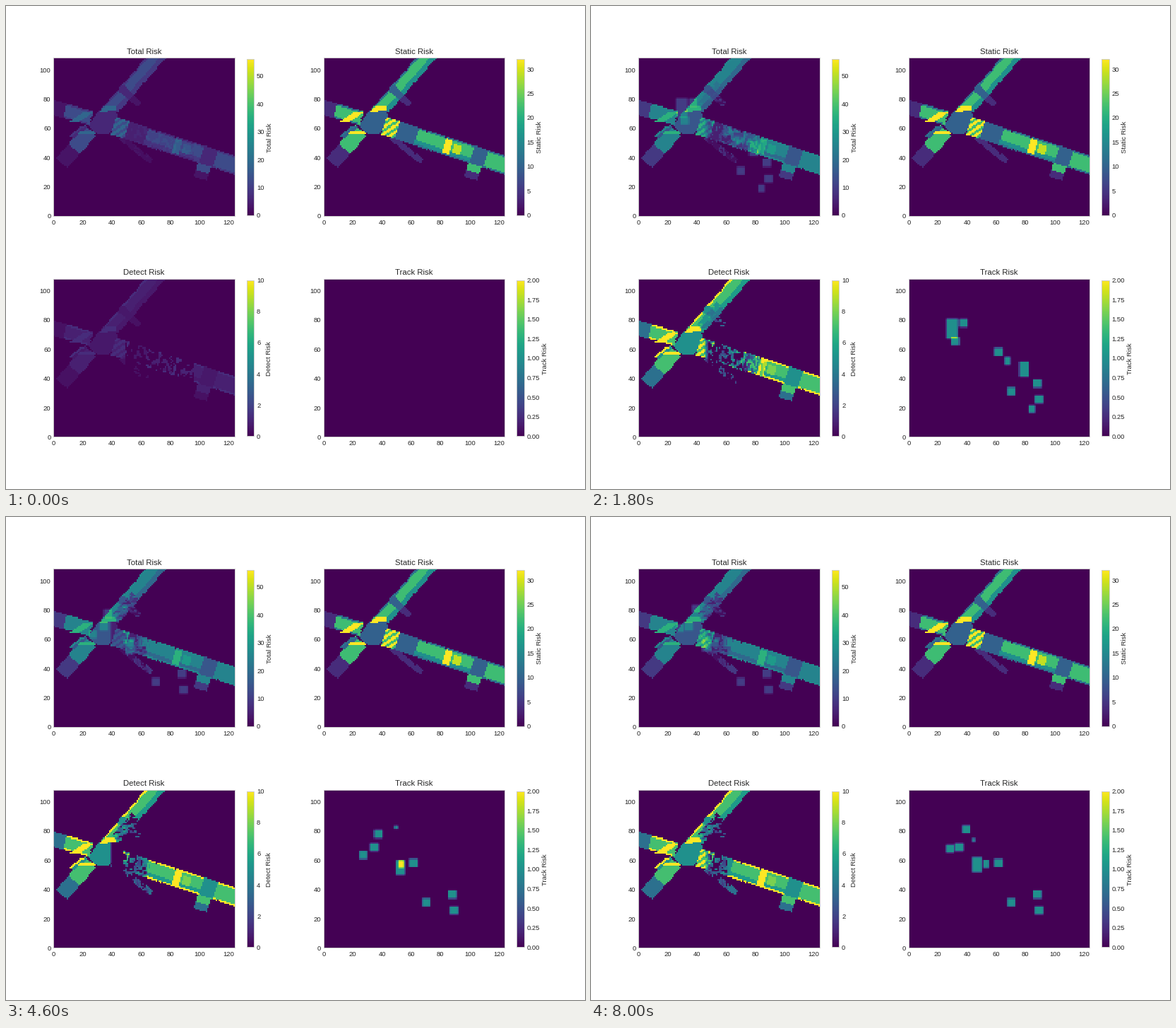
Animation of 820x683 px, one loop 8200 ms. Source, as a matplotlib script:

```python
import matplotlib.pyplot as plt
import numpy as np
from matplotlib.animation import FuncAnimation
from matplotlib.path import Path

W, H, DPI = 820, 683, 820 / 12
FRAMES, STEP_MS = 41, 200
NX, NY = 124, 108
EDGE = 1.2            # width of the kerb strip, in cells

plt.rcParams.update({
    "font.family": "Liberation Sans", "font.size": 10,
    "axes.titlesize": 12, "axes.edgecolor": ".8", "axes.linewidth": 1,
    "text.color": ".15", "axes.labelcolor": ".15",
    "xtick.color": ".15", "ytick.color": ".15",
    "xtick.major.size": 0, "ytick.major.size": 0,
    "xtick.major.pad": 5, "ytick.major.pad": 4, "axes.grid": False,
})

rng = np.random.default_rng(7)
X, Y = np.meshgrid(np.arange(NX) + 0.5, np.arange(NY) + 0.5)
CELLS = np.column_stack([X.ravel(), Y.ravel()])

static = np.zeros((NY, NX))
weight = np.zeros((NY, NX))   # detect risk once a cell is fully observed

# Surface kinds: static risk, detect weight
PATH, PLAIN, SIDE = (4, 3.7), (10, 5), (16, 5.5)
LANE, KERB, CROSS = (22, 7), (12, 10), (32, 10)


def paint(mask, kind):
    static[mask], weight[mask] = kind


def quad(*pts):
    return Path(pts).contains_points(CELLS).reshape(NY, NX)


class Arm:
    """Straight road in its own along/across coordinates."""

    def __init__(self, x, y, deg, half):
        c, s = np.cos(np.radians(deg)), np.sin(np.radians(deg))
        self.u = (X - x) * c + (Y - y) * s
        self.v = (Y - y) * c - (X - x) * s
        self.half = half

    def part(self, u0, u1, v0=None, v1=None):
        v0 = -self.half if v0 is None else v0
        v1 = self.half if v1 is None else v1
        u, v = self.u, self.v
        return (u >= u0) & (u < u1) & (v >= v0) & (v < v1)

    def kerbs(self, u0, u1):
        return self.part(u0, u1) & (abs(self.v) > self.half - EDGE)


north = Arm(37, 70, 48.8, 5.2)
west = Arm(0, 73.9, -15.5, 5)
south = Arm(5.75, 36, 49, 5.2)
east = Arm(50, 58.6, -17.9, 6.2)

paint(north.part(0, 58), LANE)
paint(north.part(0, 58, v1=-1.8), SIDE)
paint(north.part(3, 58, v0=north.half - EDGE), KERB)
paint(north.part(16.5, 21.5), PLAIN)
paint(north.part(16.5, 21, -13, -north.half), PATH)

paint(west.part(-4, 8), PATH)
paint(west.part(8, 27), LANE)
paint(west.kerbs(8, 25), KERB)
paint(quad((9.5, 63.5), (17, 63.5), (27.5, 71), (21, 71)), CROSS)

paint(south.part(13, 30), LANE)
paint(south.part(0, 13), PATH)
paint(quad((10.5, 54.5), (19.5, 61.5), (24, 61), (14, 53)), PLAIN)
paint(quad((10.5, 54.5), (19.5, 61.5), (21.5, 61.2), (12.2, 54)), KERB)
paint(quad((15.5, 55.5), (18, 58), (31, 58), (30.5, 55.8)), CROSS)

paint(Arm(46, 54, -38.7, 2).part(0, 27), PATH)
paint(east.part(-9.5, 14), PLAIN)
paint(east.part(14, 82), LANE)
paint(east.part(14, 54, v1=-2.5), SIDE)
paint(east.part(34, 39, -4.8, 4.8), CROSS)
paint(east.part(40.5, 46, -3, 3), (29, 8))
paint(east.kerbs(14, 82), KERB)
paint(east.part(54, 64), PLAIN)
paint(east.part(53.5, 62.5, -11, -east.half), LANE)
paint(east.part(53.5, 62.5, -16, -11), PATH)

paint(quad((24, 61.5), (30.5, 71.5), (44, 71.5), (44, 63), (38, 56.5),
           (29, 56)), PLAIN)
paint(quad((31.5, 71), (35, 75), (43.5, 75), (43.5, 72)), CROSS)
stripe = (-0.57 * X + 0.82 * Y) % 3.6 < 2
paint(east.part(-9.5, 0), LANE)
paint(east.part(-9.5, 0) & stripe, CROSS)

# Ragged road edges
road = np.pad(static > 0, 1, mode="edge")
rim = ~(road[:-2, 1:-1] & road[2:, 1:-1] & road[1:-1, :-2] & road[1:-1, 2:])
paint(rim & (rng.random((NY, NX)) < 0.06), (0, 0))


def noise(dx, dy):
    """Smoothed noise, uniform on 0..1."""
    base = rng.random((NY, NX))
    acc = sum(np.roll(base, (j, i), (0, 1))
              for i in range(dx) for j in range(dy))
    return acc.ravel().argsort().argsort().reshape(NY, NX) / (NX * NY)


streaks, blobs, tone = noise(5, 1), noise(2, 3), noise(2, 2)
dim = 0.4 + 0.6 * tone


def visibility(n):
    """Share of the full detect weight each cell heads for."""
    vis = np.ones((NY, NX))

    near = 44 + 5 * np.cos(2 * np.pi * n / FRAMES)
    far = 61 + 35 * np.exp(-n / 8)
    share = 0.25 + 0.4 * min(n / 20, 1)
    zone = (Y < 72) & (X > near) & (X < far)
    vis[zone] = ((blobs < share) * dim * (X >= 48))[zone]

    zone = (north.v < -north.half) & (Y > 72) & (X > 44)
    if n >= 8:
        spot = np.hypot((X - 48) / 11, (Y - 83) / 10) < 1
        zone |= spot & (Y > 74) & (north.v < 2)
    if n >= 2:
        vis[zone] = ((streaks < 0.55) * dim)[zone]
    return vis


SMALL = (5.6, 5.5)
PARKED = [(61.3, 57.8), (87.8, 36.3), (70.1, 30.9), (89, 25.4)]

# Appear, depart, arrive, vanish, start, end, size
MOVERS = [
    (1, 1, 22, 22, (48, 74), (0, 73), (8, 13.5)),
    (1, 1, 26, 40, (94, 41), (46.6, 56.5), (6.4, 10.2)),
    (1, 1, 17, 40, (82, 46), (52.8, 57.2), (4, 5.6)),
    (1, 1, 36, 36, (34.5, 66), (22.5, 61.5), SMALL),
    (9, 24, 40, 40, (37.3, 77.5), (28.3, 67.5), SMALL),
    (15, 18, 23, 40, (44, 79.6), (34.5, 68.5), SMALL),
    (16, 16, 21, 21, (48, 91), (42.5, 85.5), SMALL),
    (20, 20, 40, 40, (50.3, 83.6), (44.5, 73.5), (2.2, 2.3)),
    (27, 27, 40, 40, (47.5, 82.5), (39.2, 80.7), SMALL),
    (1, 1, 10, 10, (84.2, 18.8), (84.2, 18.8), (4.5, 4.8)),
]
MOVERS += [(1, 1, 40, 40, spot, spot, SMALL) for spot in PARKED]


def cover(size, mid, width):
    """Covered part of each cell in a row of `size` cells."""
    i = np.arange(size)
    a, b = mid - width / 2, mid + width / 2
    return np.clip(np.minimum(i + 1, b) - np.maximum(i, a), 0, 1)


def track_map(n):
    out = np.zeros((NY, NX))
    for appear, depart, arrive, vanish, p, q, (w, h) in MOVERS:
        if appear <= n <= vanish:
            k = np.clip((n - depart) / (arrive - depart), 0, 1)
            x, y = np.array(p) + k * np.subtract(q, p)
            out += np.outer(cover(NY, y, h), cover(NX, x, w))
    return np.minimum(out, 2)


def simulate():
    level = np.zeros((NY, NX))
    maps = []
    for n in range(FRAMES):
        level = level + np.clip(visibility(n) - level, -1 / 8, 1 / 8)
        detect, track = weight * level, track_map(n)
        total = 0.5 * static + 2 * detect + 10 * track
        maps.append((total, static, detect, track))
    return maps


MAPS = simulate()

fig = plt.figure(figsize=(W / DPI, H / DPI), dpi=DPI, facecolor="white")


def px_axes(x, y, w, h):
    return fig.add_axes([x / W, 1 - (y + h) / H, w / W, h / H])


def panel(name, x, y, vmax, step, label_x):
    ax = px_axes(x, y, 256.6, 223.5)
    im = ax.imshow(np.zeros((NY, NX)), cmap="viridis", vmin=0, vmax=vmax,
                   origin="lower", extent=(0, NX, 0, NY), aspect="auto",
                   interpolation="nearest")
    ax.set_xticks(range(0, 121, 20))
    ax.set_yticks(range(0, 101, 20))
    ax.set_title(name)
    cax = px_axes(x + 273.3, y + 1.8, 10.7, 220.5)
    bar = fig.colorbar(im, cax=cax, ticks=np.arange(0, vmax + 0.01, step),
                       format="%.2f" if step < 1 else "%d")
    bar.outline.set(edgecolor=".8", linewidth=1)
    fig.text(label_x / W, 1 - (y + 112.3) / H, name, rotation=90,
             ha="center", va="center")
    return im


images = [
    panel("Total Risk", 67.3, 73.5, 56, 10, 373),
    panel("Static Risk", 449.8, 73.5, 32, 5, 755.5),
    panel("Detect Risk", 67.3, 385.9, 10, 2, 372.5),
    panel("Track Risk", 449.8, 385.9, 2, 0.25, 763),
]


def update(n):
    for im, data in zip(images, MAPS[n]):
        im.set_data(data)
    return images


anim = FuncAnimation(fig, update, frames=FRAMES, interval=STEP_MS,
                     repeat=True, repeat_delay=0)
plt.show()
```
